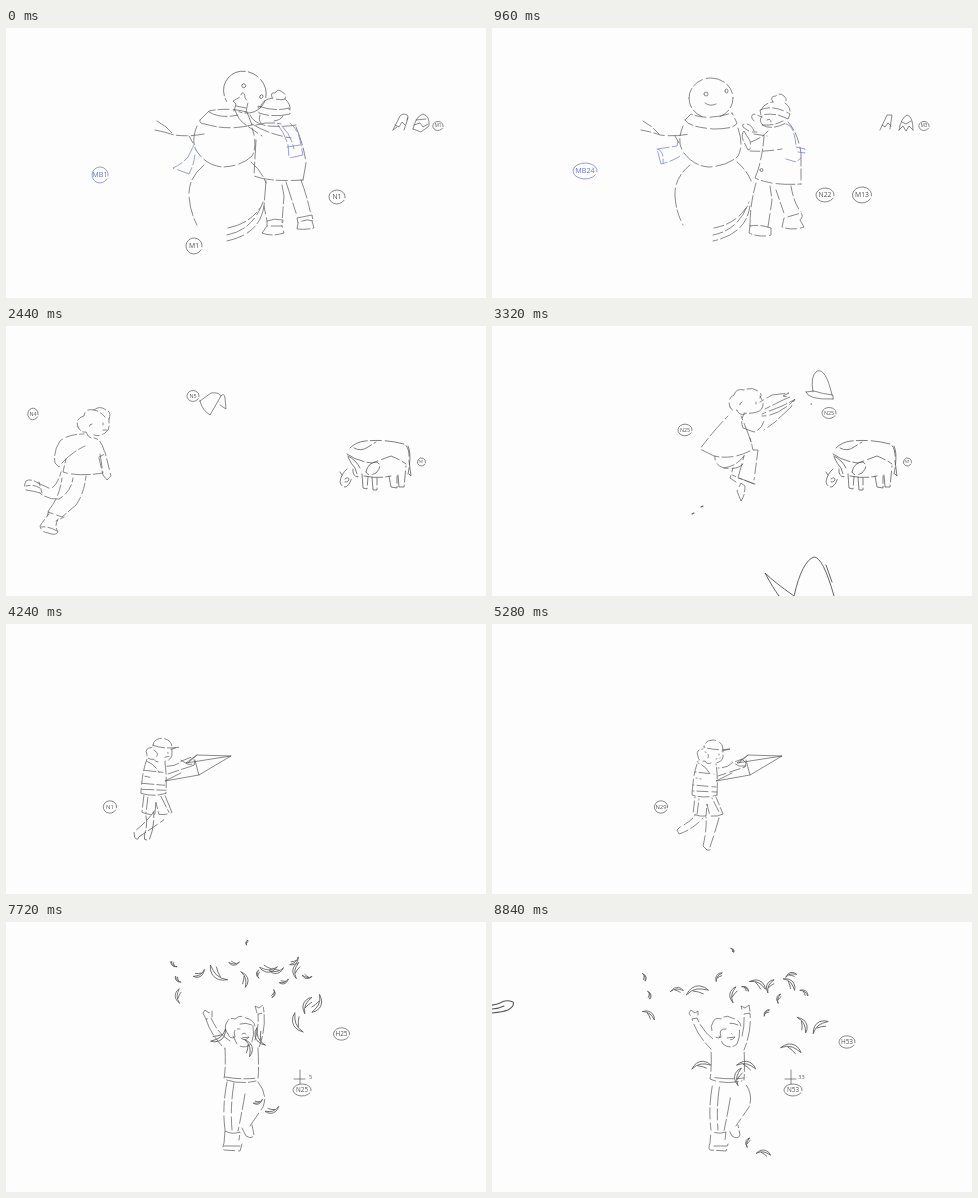
Write an HTML page with a canvas that moves like this. It is 480 px wide and 270 px high and loops after 8880 ms.

```html
<!DOCTYPE html>
<html lang="en">
<head>
<meta charset="utf-8">
<title>Seasons line test</title>
<style>
html, body { margin: 0; width: 100%; height: 100%; overflow: hidden; background: #fdfdfd; }
canvas { display: block; width: 480px; height: 270px; }
</style>
</head>
<body>
<canvas id="stage"></canvas>
<script>
const LOOP = 8880, FRAME = 1000 / 24;
const INK = '#555', BLUE = '#6a74d4';
const canvas = document.getElementById('stage');
const ratio = Math.max(1, window.devicePixelRatio || 1);
canvas.width = 480 * ratio;
canvas.height = 270 * ratio;
const ctx = canvas.getContext('2d');
const paths = new Map();
let boil = 0;

// Value at time t between [time, value] stops.
function key(t, ...stops) {
  if (t <= stops[0][0]) return stops[0][1];
  for (let i = 1; i < stops.length; i++) {
    const [t0, a] = stops[i - 1], [t1, b] = stops[i];
    if (t < t1) return a + (b - a) * (t - t0) / (t1 - t0);
  }
  return stops[stops.length - 1][1];
}
const range = (from, to, step) =>
  Array.from({ length: Math.floor((to - from) / step) + 1 }, (_, i) => from + i * step);
const hold = (t, times) => times.reduce((a, b) => b <= t ? b : a, times[0]);
// Number of the drawing on show when each one is held for k counts.
const every = (k, n) => 1 + Math.floor((n - 1) / k) * k;

function draw(d, o = {}) {
  const { x = 0, y = 0, rot = 0, cx = 0, cy = 0, sx = 1, sy = sx, color = INK, width = .68, solid = false } = o;
  if (!paths.has(d)) paths.set(d, new Path2D(d));
  ctx.save();
  ctx.translate(x + cx, y + cy);
  ctx.rotate(rot * Math.PI / 180);
  ctx.scale(sx, sy);
  ctx.translate(-cx, -cy);
  ctx.strokeStyle = color;
  ctx.lineWidth = width / Math.max(Math.abs(sx), .3);
  ctx.setLineDash(solid ? [] : [19, 3, 11, 4]);
  ctx.lineDashOffset = boil;
  ctx.stroke(paths.get(d));
  ctx.restore();
}

function write(text, x, y, size, color = INK) {
  ctx.fillStyle = color;
  ctx.font = `${size}px "Open Sans", sans-serif`;
  ctx.textAlign = 'center';
  ctx.textBaseline = 'middle';
  ctx.fillText(text, x, y);
}
function label(text, x, y, rx, ry = rx, color = INK, size = 6.8) {
  ctx.strokeStyle = color;
  ctx.lineWidth = .7;
  ctx.setLineDash([]);
  ctx.beginPath();
  ctx.ellipse(x, y, rx, ry, 0, .5, 6.4);
  ctx.stroke();
  write(text, x, y + .3, size, color);
}

const snow = {
  ball: 'M198 137Q182 150 183 168Q184 184 191 197M245 134Q255 142 260 155M258 178Q254 206 221 213M221 207Q247 202 257 174M222 200Q243 196 254 180',
  torso: 'M191 98Q185 112 190 122Q200 138 217 139Q236 138 246 128Q252 117 246 100',
  arm: 'M149 102Q160 104 168 107Q182 109 198 106M151 93L160 99L167 106M183 108L187 115',
  collarA: 'M194 92Q193 96 199 96Q222 103 246 97M194 92L203 83Q222 79 241 84M203 84Q214 91 232 87M241 84L246 97',
  collarB: 'M193 92Q196 99 222 101Q243 101 245 95L240 85M193 92L199 86Q215 93 240 85',
  tailA: 'M188 117L182 129Q176 136 167 140L183 146Q188 136 189 127',
  tailB: 'M186 113L185 118L165 121L169 136Q182 133 191 126M165 121Q172 122 171 135',
  head: 'M-22 0A22 20 0 0 1 22 0M22 0A22 20 0 0 1 8 19M-22 0A22 20 0 0 0 -8 19',
  eyes: 'M-7 -4a2 2 0 1 1 4 0a2 2 0 1 1 -4 0M14 -7a1.5 2 0 1 1 3 0a1.5 2 0 1 1 -3 0',
  smile: 'M-6 5Q-1 9 5 6'
};
const lifter = {
  hat: 'M266 69Q264 64 269 65Q272 60 276 64Q281 66 279 71Q275 73 266 70M254 80Q256 71 267 70M279 71Q285 76 284 82M252 78Q268 84 283 80L284 86Q268 90 253 85Z',
  face: 'M254 87Q252 92 255 95M268 93Q275 92 277 88M250 97Q262 93 275 96',
  arms: 'M228 83L230 76L227 73L234 69L236 65Q239 64 239 70L242 74L240 84M230 78L240 80M229 82Q232 92 240 97L256 108M244 87Q248 96 262 98Q280 99 290 97M246 96Q262 106 285 110',
  coat: 'M250 112L248 148Q262 154 297 152M290 99Q298 118 300 135L297 152',
  legs: 'M260 153L258 178L261 193M276 157L278 168L276 194M280 154L291 188M295 152Q301 168 305 187M261 193Q268 190 277 192L276 198Q267 198 261 198ZM291 190L306 187L307 193Q300 190 292 195Z',
  boots: 'M261 198L256 205Q265 209 278 205L276 198M292 195L291 201Q300 202 308 200L306 193',
  scarf: 'M272 97Q279 106 282 117L283 130L297 127L294 112Q291 100 284 95M276 98Q285 107 288 121M281 119L294 117'
};
const wrapper = {
  hat: 'M281 74Q277 68 284 68Q288 64 292 68Q296 71 293 75M269 82Q272 75 281 74M293 75Q299 79 298 86M268 82Q281 76 298 86L296 91Q283 84 269 87Z',
  face: 'M270 88Q266 93 271 97M275 92Q279 90 279 94M271 97Q281 98 291 93M270 97Q280 103 296 94',
  arms: 'M262 103Q260 97 255 96Q249 95 251 99L258 104L265 104M252 103Q249 106 251 112L256 122Q260 122 258 113ZM262 93Q257 88 262 86L270 89M262 106L275 108M259 114Q270 110 276 103M258 123Q272 124 290 121',
  coat: 'M272 108Q271 125 266 142L263 150Q280 158 309 156M296 94Q306 105 309 125L309 156M268 142a1.5 1.5 0 1 1 3 0a1.5 1.5 0 1 1 -3 0',
  legs: 'M264 155Q258 176 258 198M278 158L280 172L276 199M284 162L293 188M299 158Q302 176 309 184',
  boots: 'M258 198L257 205Q268 210 279 207L279 200Q268 196 258 198M292 190L290 199Q300 203 312 199L308 192Q312 188 309 185Z',
  scarf: 'M294 96Q299 97 301 103Q304 112 304 119M294 131L304 134L309 130M304 119L313 121L313 125L306 124'
};
const mittens = [
  'M387 102L394 88Q398 84 402 88L401 92M387 102L391 99M398 102L402 90M389 97L393 99L396 94L399 97M407 101Q410 88 417 86Q424 88 423 98L415 104L407 101M408 97L414 95L417 99L422 96M410 92L420 91',
  'M388 102L395 87L400 87L398 101M390 97L393 99L396 95L399 98M407 102Q409 90 415 87Q421 88 421 102M407 102L411 98L414 103L417 98L421 102M410 94L414 96L419 93'
];

function snowman(now) {
  const n = 1 + Math.floor(now / FRAME), shown = every(3, n);
  const t = (shown - 1) * FRAME, early = t < 520;
  boil = (shown - 1) * 11 % 37;
  for (const d of [snow.ball, snow.torso, snow.arm]) draw(d);
  draw(early ? snow.collarA : snow.collarB);
  draw(early ? snow.tailA : snow.tailB, {
    color: BLUE, cx: 188, cy: 118, rot: early ? key(t, [0, 0], [520, 14]) : key(t, [520, -14], [875, 0], [1500, 10], [2300, -4])
  });
  const head = {
    x: key(t, [0, 239], [440, 219]), y: key(t, [0, 64], [200, 58], [440, 70]), rot: key(t, [0, 40], [440, 0])
  };
  draw(snow.head, head);
  draw(snow.eyes, { ...head, solid: true });
  if (!early) draw(snow.smile, { ...head, solid: true });
  const boy = early ? lifter : wrapper;
  const x = early ? key(t, [0, 0], [520, 8]) : key(t, [520, -7], [875, 0], [1500, -3], [2300, 1]);
  const reach = early ? key(t, [0, 0], [200, -4], [520, 4]) : Math.sin((t - 875) / 150) * 2;
  for (const part of ['coat', 'face', 'hat']) draw(boy[part], { x });
  draw(boy.arms, { x, cx: 280, cy: 106, rot: reach });
  draw(boy.legs, { x: x / 2 });
  draw(boy.boots, { x: x / 2 });
  draw(boy.scarf, { x, color: BLUE, cx: 286, cy: 98, rot: early ? key(t, [0, 0], [520, -12]) : reach * 2 });
  draw(mittens[early ? 0 : 1], { solid: true });
  label('MB' + n, key(now, [0, 94], [960, 93]), key(now, [0, 147], [960, 143]), key(now, [0, 8], [960, 12]), 8, BLUE, 7.2);
  label('N' + shown, key(t, [0, 331], [875, 333]), key(t, [0, 169], [875, 167]), key(t, [0, 8], [875, 9]), 7);
  const m = 'M' + (1 + Math.floor(now / 80));
  if (now < 480) label(m, 188, 218, 8);
  else label(m, 370, 167, 9.5, 8);
  label('M' + (1 + Math.floor(now / 480)), 432, 98, 5.2, 4.5, INK, 4.5);
}

const cow = [
  'M344 122Q350 116 359 115Q380 113 398 118Q404 121 403 135L405 150L403 148M402 120Q406 128 402 148',
  'M342 130Q350 134 354 142M342 131Q345 138 349 142L352 151Q346 150 347 143M341 143Q335 148 334 156Q335 161 340 161Q345 158 346 150M334 146L336 149M339 153Q343 150 343 154Q341 157 339 156',
  'M348 122Q355 126 362 121L370 116M341 128Q350 135 366 137L385 130Q395 134 400 138M360 146Q362 136 371 136Q377 140 370 147Q362 151 360 146',
  'M358 150Q371 153 385 150M356 148L357 162L361 163L362 151M366 151L367 164L371 164L371 152M383 150L385 161L391 162L391 150M392 149L393 161L398 161L400 140'
];
const runner = {
  head: 'M72 101Q69 92 78 90Q79 82 88 84Q94 79 100 84Q106 86 103 93M72 101Q75 107 80 106Q82 112 86 112M88 84Q94 85 99 91M103 93L103 99Q104 104 99 107Q93 111 88 109M86 98Q82 98 84 103M97 97L97 99M97 104L101 104',
  body: 'M78 108Q62 108 54 115Q47 125 49 137L53 141Q62 128 79 120M60 133L57 146Q72 151 97 147L94 128M88 112Q96 113 99 128L93 131',
  arm: 'M99 126L105 150L101 154L97 149L93 132',
  back: 'M55 146Q52 158 45 163L32 157M67 152Q65 166 53 173Q42 174 34 167M32 157Q24 152 20 155Q17 160 20 164Q28 165 34 167M33 156L36 167M20 160Q28 158 34 162',
  front: 'M80 150Q78 168 70 179L56 191L42 186M56 152Q54 170 43 184L41 191M58 191L50 195M43 188Q37 195 34 200Q35 206 42 207Q50 210 52 206Q48 200 52 193M35 201Q43 200 51 205'
};
const leaper = {
  head: 'M238 81Q235 72 242 69Q244 62 252 64Q261 60 267 66Q271 68 268 72M238 81Q240 86 245 84Q247 90 253 88M268 70L271 76Q272 84 265 86Q258 88 252 87M250 76Q246 77 249 82M264 76L264 78',
  body: 'M236 90Q222 104 208 123L222 130Q240 134 258 125M252 88Q248 95 251 102L262 106Q270 103 272 95M249 90Q256 106 260 119',
  arms: 'M268 76L280 69L297 67L291 70L298 71L291 74L273 83M270 90Q284 90 298 78L303 73L299 81L283 96L272 104M270 88L290 80L302 74',
  legs: 'M223 130Q222 139 232 142Q246 140 254 127M232 142Q246 144 251 138M258 112L261 124L266 124Q264 140 262 154M252 130L246 152L263 158M240 149L262 158M241 142L238 152L244 156M249 157L245 165L249 175Q253 170 253 160Z'
};
const hatSide = 'M194 75L205 67Q213 66 215 70L204 89Q196 84 194 75ZM215 70Q218 66 219 72L220 83L214 79';
const hatUp = 'M321 66Q318 50 325 45Q334 42 340 69M314 66Q316 74 341 73M314 66L322 65Q331 68 341 69L341 73';
const ears = 'M287 270Q281 262 273 247Q282 256 302 270Q310 235 322 231Q331 231 342 270L352 340M287 270L318 340M334 239L340 256';

function meadow(now) {
  const n = 1 + Math.floor((now - 2315) / FRAME), shown = every(3, n);
  const t = 2315 + (shown - 1) * FRAME;
  boil = 0;
  for (const d of cow) draw(d, { width: .75 });
  label('N1', 415.5, 136, 4, 4, INK, 3.6);
  const hat = {
    x: key(now, [2320, -12], [2440, 0], [2880, 62], [3320, 123]),
    y: key(now, [2320, 5], [2440, 0], [2660, 10], [2880, -12], [3320, -20])
  };
  boil = shown * 13 % 37;
  if (now < 2880) draw(hatSide, { ...hat, cx: 207, cy: 77, rot: key(now, [2440, 0], [2880, 60]), solid: true });
  else draw(hatUp, {
    x: hat.x - 123 + key(now, [3320, 0], [3800, -6]), y: hat.y + 20 + key(now, [3320, 0], [3600, -14], [4100, 16]),
    cx: 330, cy: 60, rot: key(now, [2880, -40], [3320, 0], [4100, 30]), solid: true
  });
  label('N' + every(2, n + 1), key(now, [2320, 175], [2440, 187], [3320, 337]), key(now, [2440, 70], [3320, 87]), key(now, [2440, 6], [3320, 7]), 5.5, INK, 5.4);
  label('N' + shown, key(t, [2315, 5], [2440, 27], [2840, 108], [3315, 193]), key(t, [2440, 88], [3315, 104]), key(t, [2440, 5.2], [3315, 7]), 5.8, INK, 5.4);

  if (t < 3100) {
    const x = (t - 2440) * .21, phase = (t - 2440) / 330 * Math.PI;
    const swing = Math.sin(phase) ** 2, y = -3 * swing;
    draw(runner.head, { x, y });
    draw(runner.body, { x, y });
    draw(runner.arm, { x, y, cx: 97, cy: 128, rot: -50 * swing });
    draw(runner.back, { x, y, cx: 62, cy: 148, rot: -62 * swing });
    draw(runner.front, { x, y, cx: 68, cy: 150, rot: 18 * Math.sin(2 * phase) - 10 * swing });
  } else {
    const x = key(t, [3100, -30], [3315, 0], [3700, 22], [4100, 26]);
    const y = key(t, [3100, 28], [3200, 9], [3315, 0], [3420, 2], [3640, 24], [3760, 27]);
    draw(leaper.head, { x, y });
    draw(leaper.body, { x, y });
    draw(leaper.arms, { x, y, cx: 266, cy: 90, rot: key(t, [3100, 35], [3315, 0], [3700, 20]) });
    draw(leaper.legs, { x, y, cx: 245, cy: 130, rot: key(t, [3100, 24], [3315, 0], [3640, -16]) });
    if (t > 3240 && t < 3560) draw('M200 188L202 187M209 181L211 180M319 78L319.5 78', { solid: true, width: 1.1 });
  }
  if (now > 3160) draw(ears, { y: key(now, [3160, 40], [3320, 0], [3700, -38], [4100, -50]), width: .9, solid: true });
}

const kiteBoy = {
  head: 'M212 123Q213 116 221 116Q231 117 231 125M212 123Q222 127 238 125L230 127M211 125Q203 126 206 132Q206 138 213 137Q215 141 219 139M213 128Q218 130 216 134M231 127L231 133Q230 138 224 139M227 130L227 131M224 135L228 134',
  body: 'M206 137Q201 150 200 171Q212 175 225 171M224 140Q226 152 225 171M203 148L222 150M204 154L209 155M201 161L224 163M201 167L225 168M206 139Q214 142 218 150',
  arms: 'M226 144Q236 144 240 139L250 135L254 139L253 143L238 148L226 152M240 138L247 142L254 142',
  shorts: 'M203 173L201 190Q208 193 214 192L215 180L218 192Q226 193 231 190L224 173M207 175L205 191M220 174L228 190',
  back: 'M203 191Q200 197 188 203L185 206L187 210Q200 206 211 194',
  front: 'M214 193Q215 206 211 222L215 226Q220 227 218 223Q223 208 227 194'
};
const kite = 'M247 139L256 131L290 132L258 151L254 136M258 151L224 157L240 149M256 131L245 139L290 132';
const flyer = [
  'M201 133Q200 124 209 123Q219 123 219 133Q217 140 209 140Q203 139 201 133M204 118L206 107Q209 104 212 106L209 119M204 113L211 114M203 114Q195 122 188 140Q185 147 189 151L196 149Q200 140 202 134M212 114Q219 120 223 138Q222 143 219 142M190 138Q195 137 199 142',
  'M196 149Q193 162 194 173M221 140Q222 160 222 176M196 150Q210 147 219 150M194 156Q208 153 221 157M194 163Q208 160 221 164M193 169Q208 167 222 171M194 174Q208 176 222 177',
  'M193 176L186 196Q194 203 200 201L208 186Q212 194 219 200Q226 198 231 195L222 178M200 178L190 198M219 179L226 196M187 201L185 222L183 227L196 227L196 202M219 200L230 225L239 226L231 198M230 225L232 227L240 226'
];
const line = 'M198 113Q172 111 150 104Q128 97 123 84Q119 70 126 56Q140 39 158 28';
const bridle = 'M158 27L172 -49M158 27L198 -36M158 27L240 -22';
const kiteTimes = [...range(4120, 5000, 80), 5120, 5280, 5400, 5520, 5680, 5840, ...range(5880, 6600, 80)];

function kiteFlight(now) {
  const t = hold(now, kiteTimes), n = every(4, 1 + Math.floor((t - 4099) / FRAME));
  boil = n * 7 % 37;
  const lx = key(t, [4120, 100], [5000, 143], [5120, 157], [5280, 169], [5680, 194], [5840, 200], [6300, 164]);
  const facing = t < 5880;
  const x = facing ? lx - 169 : lx - 164;
  const fly = {
    x: t < 5280 ? x : key(t, [5280, 0], [5400, 14], [5520, 34], [5680, 72], [5840, 60], [6120, -50]),
    y: key(t, [5280, 0], [5400, -32], [5520, -68], [5680, -81], [5840, -92], [6120, -140])
  };
  if (facing) {
    const phase = (t - 5280) / 320 * Math.PI, swing = Math.sin(phase) ** 2, y = -2 * swing;
    for (const part of ['head', 'body', 'shorts']) draw(kiteBoy[part], { x, y });
    draw(kiteBoy.arms, { x, y, cx: 224, cy: 147, rot: key(t, [5280, 0], [5520, -45]) });
    draw(kiteBoy.back, { x, y, cx: 207, cy: 190, rot: -55 * swing });
    draw(kiteBoy.front, { x, y, cx: 220, cy: 190, rot: 45 * swing });
  } else {
    for (const d of flyer) draw(d, { x });
  }
  if (t < 6120) {
    const grow = key(t, [5680, 1], [6120, 1.8]);
    draw(kite, { ...fly, cx: 257, cy: 142, rot: key(t, [5280, 0], [5520, -30], [6120, -110]), sx: grow, solid: true });
    if (t > 5280) {
      const hx = facing ? 246 + x : 207 + x, hy = facing ? 128 : 107;
      const ex = 257 + fly.x, ey = 142 + fly.y;
      ctx.setLineDash([20, 3]);
      ctx.strokeStyle = INK;
      ctx.lineWidth = .7;
      ctx.beginPath();
      ctx.moveTo(hx, hy);
      ctx.quadraticCurveTo((hx + ex) / 2 - 8, (hy + ey) / 2 + 14, ex, ey);
      ctx.stroke();
    }
  } else {
    const sway = { x, cx: 198, cy: 113, rot: key(t, [6120, 28], [6600, 0]) };
    draw(line, sway);
    draw(bridle, { ...sway, solid: true });
  }
  label('N' + n, lx, key(t, [5280, 183], [6200, 186]), 6.6, 6.2, INK, 5.8);
}

const thrower = {
  head: 'M222 112Q217 106 221 100Q223 95 229 97Q234 92 240 96Q248 98 249 104M222 112Q224 118 229 115Q226 106 234 107M234 102Q240 100 246 103M247 104Q249 114 245 122Q238 128 231 122L227 114M236 112Q238 110 240 112M235 116Q239 120 243 115Z',
  left: 'M224 119Q212 112 205 96L200 97Q204 112 219 127M200 97L197 91L199 88L203 91L206 89L206 95',
  right: 'M249 118Q253 105 252 92L258 91Q260 108 252 128M251 91L249 84L253 86L257 83L258 90',
  body: 'M219 126Q220 145 218 157Q232 163 250 159M252 126Q253 145 252 158M219 155Q235 158 252 156',
  legs: 'M221 160Q216 185 219 208M239 172Q236 190 232 209M228 161Q224 185 226 208M252 160Q262 172 257 185Q250 195 244 204',
  shoes: 'M219 209Q226 213 234 210L233 218M219 209L218 221Q216 227 218 228L234 229L236 222M218 224L235 224M236 206L240 214Q246 218 248 213L246 203'
};
// x, y, angle, size
const leaves = [
  [241, 28, 60, .3], [153, 55, 75, .5], [226, 54, -50, .65], [158, 73, 80, .5], [158, 92, 40, .9],
  [185, 67, 0, .8], [205, 67, -8, 1.4], [240, 72, -75, 1], [254, 66, 40, .5], [267, 61, 30, 1.1],
  [277, 63, -60, .9], [299, 52, -10, .7], [299, 61, 50, 1], [313, 70, 40, .6], [286, 76, -70, .6],
  [274, 90, -45, .5], [312, 102, 65, 1.1], [327, 103, -35, 1.2], [300, 125, 18, 1.3],
  [209, 142, -8, 1.2], [255, 142, 15, 1.2], [245, 154, -75, 1.1], [255, 220, -70, .6], [272, 230, 12, .9]
];
const leafShape = 'M-8 3Q-4 -3 2 -2Q6 -1 8 2Q3 0 0 0Q-4 0 -8 3M-3 1Q1 2 4 4';
const nearLeaf = 'M-16 84Q2 84 8 81Q14 77 21 80Q23 84 16 88Q8 91 -16 92M-10 87Q4 88 12 84';
const leafTimes = [6680, 6760, 7000, ...range(7160, 7960, 80), 8120, 8240, 8360, 8520, 8600, 8680, 8760, 8800, 8840];

function autumn(now) {
  const t = hold(now, leafTimes), n = every(2, 1 + Math.floor((t - 6670) / FRAME));
  boil = n * 9 % 37;
  const y = key(t, [6680, 35], [6760, 34], [7000, 19], [7160, 4], [7320, -3], [7560, 0]);
  const x = key(t, [6680, -8], [7160, 0]);
  const drop = key(t, [6760, 1], [7000, .75], [7240, 0]);
  draw(thrower.head, { x, y, cx: 235, cy: 122, rot: drop * 20 });
  draw(thrower.body, { x, y });
  draw(thrower.left, { x, y, cx: 222, cy: 124, rot: -130 * drop });
  draw(thrower.right, { x, y, cx: 251, cy: 124, rot: 130 * drop });
  draw(thrower.legs, { x: x / 2, cx: 236, cy: 210, sx: 1, sy: 1 - y / 53 });
  draw(thrower.shoes);

  const nx = key(t, [6680, 287], [7160, 289], [8120, 301]);
  label('N' + n, nx, 168, 9, 6, INK, 6.4);
  if (t >= 7160) {
    const k = key(t, [7080, 0], [8840, 1]);
    const out = 1 - (1 - k) ** 4, lift = 34 * Math.sin(Math.PI * Math.sqrt(k)) * (1 - k);
    leaves.forEach(([lx, ly, a, s], i) => draw(leafShape, {
      x: 238 + (lx - 238) * out, y: 106 + (ly - 106) * out - lift,
      rot: a + (1 - k) * (i % 2 ? 240 : -200), sx: s, width: .75, solid: true
    }));
    label('H' + n, key(t, [7160, 325], [7960, 340], [8360, 355]), key(t, [7160, 105], [8360, 120]), 8, 6.2, INK, 6.4);
    draw('M-2 -20V-6M-8 -11H3', { x: nx, y: 168, solid: true });
    write(Math.max(1, n - 20), nx + 8.5, 156, 5.5);
  }
  if (t >= 8520) draw(nearLeaf, { x: key(t, [8520, -24], [8840, 0]), width: 1.1, solid: true });
}

function render(t) {
  ctx.setTransform(ratio, 0, 0, ratio, 0, 0);
  ctx.fillStyle = '#fdfdfd';
  ctx.fillRect(0, 0, 480, 270);
  ctx.lineCap = ctx.lineJoin = 'round';
  const step = Math.floor(t / 40) * 40;
  if (step < 2320) snowman(step);
  else if (step < 4120) meadow(step);
  else if (step < 6680) kiteFlight(step);
  else autumn(step);
}

const start = performance.now();
function tick() {
  render((performance.now() - start) % LOOP);
  requestAnimationFrame(tick);
}
tick();
</script>
</body>
</html>
```
